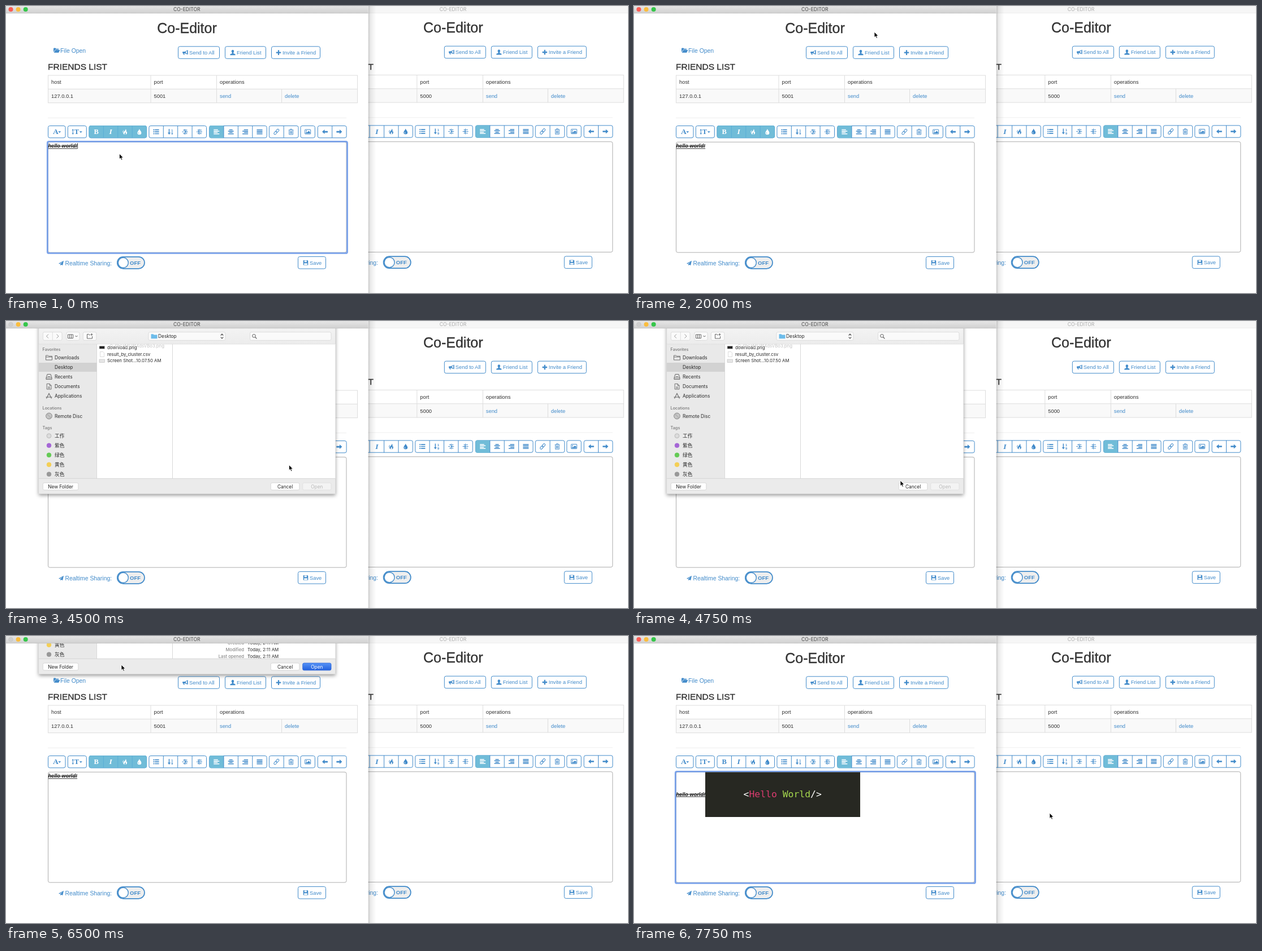
Write an HTML page that moves like this. It is 1100 px wide and 509 px high and loops after 8 s.

```html
<!DOCTYPE html>
<html lang="en">
<head>
<meta charset="utf-8">
<title>Co-Editor</title>
<style>
html, body { margin: 0; width: 100%; height: 100%; overflow: hidden; background: #fff; }
svg { display: block; width: 1100px; height: 509px; }
text { font-family: "Liberation Sans", Arial, sans-serif; white-space: pre; }
.ui { font-family: Inter, "Noto Sans CJK SC", "Noto Sans CJK", sans-serif; }
.serif { font-family: "Liberation Serif", serif; }
.mono { font-family: "DejaVu Sans Mono", monospace; }
</style>
</head>
<body>
<svg id="stage" viewBox="0 0 1100 509" xmlns="http://www.w3.org/2000/svg"></svg>
<script>
const BLUE = '#428bca', ACTIVE = '#70bcd8', DARK = '#333';
const LOOP = 8000, STEP = 250;

// Drawing helpers
const text = (x, y, s, size, fill = DARK, extra = '') =>
  `<text x="${x}" y="${y}" font-size="${size}" fill="${fill}" ${extra}>${s}</text>`;
const ui = (x, y, s, size, fill = '#2a2a2a', extra = '') =>
  text(x, y, s, size, fill, 'class="ui" ' + extra);
const rect = (x, y, w, h, fill, stroke = 'none', r = 0, extra = '') =>
  `<rect x="${x}" y="${y}" width="${w}" height="${h}" rx="${r}" fill="${fill}" stroke="${stroke}" ${extra}/>`;
const dot = (x, y, r, fill, stroke = 'none', extra = '') =>
  `<circle cx="${x}" cy="${y}" r="${r}" fill="${fill}" stroke="${stroke}" ${extra}/>`;
const line = (d, stroke = 'currentColor', w = 1) =>
  `<path d="${d}" fill="none" stroke="${stroke}" stroke-width="${w}"/>`;
const solid = (d, fill = 'currentColor') => `<path d="${d}" fill="${fill}" fill-rule="evenodd"/>`;
const layer = (id, body, extra = '') => `<g id="${id}" ${extra}>${body}</g>`;
const rows = (starts, widths) =>
  line(starts.map((x, i) => `M${x} ${i * 2.4 - 3.6}h${widths[i]}`).join(''), 'currentColor', 1.5);
const letter = (s, x, size, extra) =>
  text(x, 4.2, s, size, 'currentColor', `class="serif" text-anchor="middle" ${extra}`);
const caret = x => solid(`M${x} -.8h5l-2.5 2.8z`);
const indent = dir =>
  line('M0 -5V5M-5 0H-2', 'currentColor', 1) +
  line('M1 -3H4M1 0H5M1 3H4M-3 -3H0M-3 3H0', 'currentColor', 1.2) +
  solid(`M${-2 * dir} -2v4l${2.4 * dir} -2z`);
const arrow = d => solid(`M${-5 * d} 0L${-.5 * d} -4V-1.3H${5 * d}V1.3H${-.5 * d}V4Z`);

const icons = {
  font: letter('A', -2, 13.5, 'font-weight="bold"') + caret(2.5),
  size: line('M-7.5 -4V4', 'currentColor', 1) + solid('M-9.3 -2.5l1.8 -2.5 1.8 2.5zM-9.3 2.5l1.8 2.5 1.8 -2.5z') +
    letter('T', -1, 12.5, 'font-weight="bold"') + caret(4),
  bold: letter('B', 0, 12.5, 'font-weight="bold"'),
  italic: letter('I', 0, 13.5, 'font-style="italic" font-weight="bold"'),
  fire: solid('M1 -5C2 -2 -4 0 -3 3 -2.7 4 -1.6 5 -.5 5 -1.8 3 .5 2 .4 .5 2 2 1.6 4 .8 5 3.5 4.4 4.2 2 3 -.6L2.3 .6C2.4 -2 2.4 -3.8 1 -5ZM-2.5 -3C-3.6 -1.5 -4.8 0 -4 2 -3.7 0 -2 -1 -2.5 -3Z'),
  drop: solid('M0 -5C1 -2.2 3.5 -.5 3.5 1.8A3.5 3.3 0 0 1 -3.5 1.8C-3.5 -.5 -1 -2.2 0 -5ZM-2 1.5C-2 3 -1 3.6 0 3.8 -.8 3 -1 2.3 -1 1.2Z'),
  bullets: line('M-2.4 -3.4H5M-2.4 0H5M-2.4 3.4H5', 'currentColor', 1.7) +
    [-3.4, 0, 3.4].map(y => dot(-4.2, y, 1.1, 'currentColor')).join(''),
  order: line('M-2.5 -5V3', 'currentColor', 1.5) + solid('M-5 1.5h5l-2.5 3.6z') +
    text(1.2, -.4, '1', 5.5, 'currentColor', 'font-weight="bold"') + text(1.2, 5, '9', 5.5, 'currentColor', 'font-weight="bold"'),
  outdent: indent(-1),
  indent: indent(1),
  left: rows([-5, -5, -5, -5], [7.5, 10, 7, 10]),
  center: rows([-3, -5, -3, -5], [6, 10, 6, 10]),
  right: rows([-2.5, -5, -2, -5], [7.5, 10, 7, 10]),
  justify: rows([-5, -5, -5, -5], [10, 10, 10, 10]),
  link: `<g transform="rotate(-48)">${rect(-5.8, -1.9, 6.2, 3.8, 'none', 'currentColor', 1.9)}${rect(-.4, -1.9, 6.2, 3.8, 'none', 'currentColor', 1.9)}</g>`,
  trash: line('M-4.3 -3.2H4.3M-1.5 -3.4V-4.8H1.5V-3.4M-3.4 -3V4.8H3.4V-3M-1.4 -1.5V3.5M0 -1.5V3.5M1.4 -1.5V3.5', 'currentColor', .9),
  image: rect(-5, -4, 10, 8, 'none', 'currentColor', .6) + dot(-2.4, -1.6, 1, 'currentColor') + solid('M-4 3V1.8L-2 .2 -.8 1.2 1.7 -1.8 4 .8V3Z'),
  back: arrow(1),
  next: arrow(-1),
  horn: solid('M-5 -1.6L-1 -1.8 4 -4.5V3.5L-1 1.2 -2 1.2 -1.2 4H-3L-4 1.2H-5ZM4.4 -4.5h.8v8h-.8zM1 -2v2.7l2 1V-3z'),
  user: solid('M0 -5C3 -5 2.7 -.9 1.2 .4V1.4L4.8 3V4.8H-4.8V3L-1.2 1.4V.4C-2.7 -.9 -3 -5 0 -5Z'),
  plus: solid('M-1.2 -4.5h2.4v3.3h3.3v2.4h-3.3v3.3h-2.4v-3.3h-3.3v-2.4h3.3z'),
  folder: solid('M-5.5 3V-3.6L-4.8 -4.4H-2L-1 -3.2H3.6V-1.6H-2.6ZM-2.2 -1H6L3.6 3.8H-4.8Z'),
  disk: solid('M-4.5 -4.5H3.5L4.5 -3.5V4.5H-4.5ZM-2.5 -4V-1H2V-4ZM-3 1V4H3V1Z'),
  plane: solid('M5 -5L3 4.2 -.2 2.8 -1.7 4.8V2L3 -3 -2.8 1.5 -5 .5Z')
};
const icon = (name, x, y, color = BLUE, scale = 1) =>
  `<g transform="translate(${x} ${y}) scale(${scale})" color="${color}">${icons[name]}</g>`;

// Toolbar group; active is '', 'first' or 'all'
function group(x, names, active = '', cell = 25.4) {
  const y = 212.5, h = 21.3, w = cell * names.length, all = active === 'all';
  let s = rect(x, y, w, h, all ? ACTIVE : '#fff', all ? '#62b3d6' : BLUE, 3);
  if (active === 'first') s += solid(`M${x + cell} ${y - .5}h${3 - cell}q-3 0 -3 3v${h - 5}q0 3 3 3h${cell - 3}z`, ACTIVE);
  names.forEach((n, i) => {
    if (i) s += line(`M${x + cell * i} ${y}v${h}`, all ? '#5aaed6' : BLUE);
    s += icon(n, x + cell * (i + .5), y + 10.6, all || (active === 'first' && !i) ? '#fff' : BLUE);
  });
  return s;
}
const button = (x, y, w, name, label, tx) =>
  rect(x, y, w, 21.5, '#fff', BLUE, 3) + icon(name, tx - 7, y + 10.8, BLUE, .95) + text(tx, y + 14.3, label, 9.33, BLUE);

function page(port, marks) {
  const medium = (c, w) => `stroke="${c}" stroke-width="${w}"`;
  const format = ['bold', 'italic', 'fire', 'drop'];
  return text(320, 48, 'Co-Editor', 25, DARK, 'text-anchor="middle" ' + medium(DARK, .35)) +
    icon('folder', 89.5, 79) + text(96, 82.6, 'File Open', 10.4, BLUE) +
    button(304.5, 71.8, 73, 'horn', 'Send to All', 324) +
    button(387.5, 71.8, 72, 'user', 'Friend List', 408) +
    button(469.5, 71.8, 86, 'plus', 'Invite a Friend', 489) +
    text(74, 113.4, 'FRIENDS LIST', 15.5, DARK, medium(DARK, .35)) +
    rect(74.5, 147.5, 547, 24, '#f9f9f9') + rect(74.5, 123, 547, 48.7, 'none', '#ddd') +
    line('M74 147.3H622M256 123V171.7M372.5 123V171.7M487.5 147.3V171.7', '#ddd') +
    text(80, 138.2, 'host', 9.33) + text(261.5, 138.2, 'port', 9.33) + text(378, 138.2, 'operations', 9.33) +
    text(80, 163.2, '127.0.0.1', 9.33) + text(261.5, 163.2, port, 9.33) +
    text(378, 163.2, 'send', 9.33, BLUE) + text(493, 163.2, 'delete', 9.33, BLUE) +
    line('M74 198.5H602', '#eee') +
    group(74.5, ['font'], '', 30.5) + group(109.3, ['size'], '', 33) +
    group(147, format) + (marks ? layer('marks', group(147, format, 'all')) : '') +
    group(252.9, ['bullets', 'order', 'outdent', 'indent']) +
    group(359.6, ['left', 'center', 'right', 'justify'], 'first') +
    group(465.4, ['link', 'trash'], '', 25.8) + group(521, ['image']) + group(551.3, ['back', 'next']) +
    rect(74.5, 241.3, 527.5, 195.8, '#fff', '#adadad', 3) +
    icon('plane', 97.5, 456.2, BLUE, .9) + text(104.5, 459.8, 'Realtime Sharing:', 10.4, BLUE) +
    rect(196.8, 444.8, 48.2, 21, '#eee', BLUE, 10.5, 'stroke-width="1.7"') +
    dot(207.3, 455.3, 9, '#fff', BLUE, 'stroke-width="1.4"') +
    text(219, 458.8, 'OFF', 9.5, BLUE, 'font-weight="bold"') +
    button(516.5, 444.5, 49, 'disk', 'Save', 537);
}

const picture = `${rect(0, 0, 274, 79.5, '#272822')}<text class="mono" x="67.6" y="44.5" font-size="16.4" fill="#fff">&lt;<tspan fill="#dc3c70">Hello</tspan> <tspan fill="#a6d94e">World</tspan>/&gt;</text>`;
const place = (x, y, scale = 1) => `<g transform="translate(${x} ${y}) scale(${scale})">${picture}</g>`;

function dialog() {
  const control = (x, w) => rect(x, 19.7, w, 14.6, '#fafafa', '#d6d6d6', 2.5, 'stroke-width=".8"');
  const push = (x, w, label, fill = '#fff', color = '#222', edge = '#d0d0d0') =>
    rect(x, 287, w, 12.8, fill, edge, 2.5, 'stroke-width=".8"') + ui(x + w / 2, 296.5, label, 8.3, color, 'text-anchor="middle"');
  const head = (y, s) => ui(64.5, y, s, 7.3, '#777', 'font-weight="500"');
  const places = ['Downloads', 'Desktop', 'Recents', 'Documents', 'Applications'];
  const tags = [['工作', '#dcdcdc'], ['紫色', '#a566d6'], ['绿色', '#64cb55'], ['黄色', '#f4cf55'], ['灰色', '#989898']];
  const folder = (x, y, c) => line(`M${x} ${y + 3.8}v-8h4l1 1.3h6v6.7zM${x} ${y - 1.4}h11`, c, .9);
  const thumb = rect(165, 44.3, 9.5, 5, '#222', '#ccc', 0, 'stroke-width=".7"');
  const meta = (y, k, v, c = '#2a2a2a') => ui(421, y, k, 7.7, '#888', 'text-anchor="end" font-weight="500"') + ui(427, y, v, 7.9, c);
  const pick =
    rect(160.5, 41, 134, 11.4, '#2460dc') + thumb + ui(179, 49.8, 'download.png', 7.8, '#fff') +
    rect(381.5, 94.5, 114, 39.5, '#fff', '#ddd', 1, 'filter="url(#soft)"') + place(386.5, 99, .3814) +
    ui(438, 205.2, 'download.png', 10, '#2a2a2a', 'text-anchor="middle"') +
    ui(438, 218.2, 'PNG image - 3 KB', 7.7, '#808080', 'text-anchor="middle" font-weight="500"') +
    meta(242.6, 'Tags', 'Add Tags...', '#bbb') + meta(254.4, 'Created', 'Today, 2:11 AM') +
    meta(266.2, 'Modified', 'Today, 2:11 AM') + meta(278, 'Last opened', 'Today, 2:11 AM');

  return rect(58, 0, 524.5, 306.5, '#ececec', '#c4c4c4', 1, 'stroke-width=".6" filter="url(#drop)"') +
    rect(58, 41, 102.5, 238, '#e9e9e9') + rect(160.5, 41, 422, 238, '#fff') +
    line('M160.5 41V279M294.5 41V279', '#d9d9d9') +
    rect(58, 74, 102.5, 16, '#d2d2d2') + head(53, 'Favorites') +
    places.map((s, i) => ui(86, 68.1 + i * 17, s, 8.3)).join('') +
    folder(70.5, 65.3, '#666') +
    line('M71 101L73 94.5H79L81 101V103.5H71ZM71 101H81M73.5 98.5H78.5', '#666', 1) +
    line('M72.2 111.3H77L80 114.3V121H72.2ZM77 111.3V114.3H80M74 117H78M74 119H78', '#666', .9) +
    line('M71.5 137.5L76 128.5 80.5 137.5M70.5 135H81.5', '#666', 1.1) +
    head(156.7, 'Locations') + dot(76, 168.5, 5.3, '#c9c9c9', '#777', 'stroke-width=".9"') + dot(76, 168.5, 1.5, '#f2f2f2', '#777', 'stroke-width=".6"') +
    line('M73 165.5L75 167.5M77 169.5L79 171.5', '#777', .8) + ui(86, 171.6, 'Remote Disc', 8.3) + head(192, 'Tags') +
    tags.map(([s, c], i) => dot(76, 203.7 + i * 17, 3.9, c, i ? c : '#aaa', 'stroke-width=".7"') + ui(86, 207 + i * 17, s, 8.67)).join('') +
    thumb + ui(179, 49.8, 'download.png', 7.8) +
    layer('ghost', ui(280, 47, '0_4bcaMU8t4dsVBo3.png', 7.8, '#c4c4c4', 'text-anchor="end"')) +
    line('M166.5 54.5h5l2 2v7h-7z', '#ccc', .7) + ui(179, 61.6, 'result_by_cluster.csv', 7.8) +
    rect(165, 68, 9.5, 5.5, '#e6e6e6', '#bbb', 0, 'stroke-width=".6"') + ui(179, 73.4, 'Screen Shot...10.07.50 AM', 7.8) +
    layer('pick', pick) +
    rect(58.3, 13, 524, 28, 'url(#head)') + line('M58 41H582', '#dadada', .7) +
    control(65.4, 33.6) + line('M82.3 20V34', '#d6d6d6', .8) + line('M75 23.5L71.5 27 75 30.5M89.5 23.5L93 27 89.5 30.5', '#999') +
    control(107, 23) + line('M109.5 24h9v6.5h-9zM112.5 24v6.5M115.5 24v6.5', '#555', .9) + line('M122.5 26l2 2 2 -2', '#555') +
    control(136.3, 23.5) + line('M143.5 31V23.5h3l1 1.2h1.5M143.5 31h9V27M151.5 22v4M149.5 24h4', '#555', .9) +
    control(252, 136) + solid('M256.5 31.3v-8h4l1 1.3h6v6.7z', '#6dbcea') + ui(269, 30.2, 'Desktop', 8.4) +
    line('M379.8 25.7l2.2 -2.5 2.2 2.5M379.8 28.5l2.2 2.5 2.2 -2.5', '#333', 1.1) +
    control(431.5, 143.5) + dot(438.5, 26.4, 2.8, 'none', '#555') + line('M440.6 28.5L443.4 31.3', '#555', 1.1) +
    rect(58.3, 279, 524, 27.2, '#ebebeb') + line('M58 279.3H582.5', '#d2d2d2', .8) +
    push(65.3, 62.5, 'New Folder') + push(468.3, 50.5, 'Cancel') +
    push(524.7, 50.3, 'Open', '#f3f3f3', '#b8b8b8', '#dedede') +
    layer('ready', push(524.7, 50.3, 'Open', 'url(#go)', '#fff', '#2a66dc'));
}

const grad = (id, a, b, turn = 'x2="0" y2="1"') =>
  `<linearGradient id="${id}" ${turn}><stop stop-color="${a}"/><stop offset="1" stop-color="${b}"/></linearGradient>`;
const title = (x, fill) => ui(x, 9.2, 'CO-EDITOR', 8.5, fill, 'text-anchor="middle"');

document.getElementById('stage').innerHTML =
  `<defs>${grad('bar', '#e6e6e6', '#d0d0d0')}${grad('head', '#f3f3f3', '#ececec')}${grad('go', '#5592f6', '#2260dd')}
  <linearGradient id="edge"><stop stop-color="#000" stop-opacity=".22"/><stop offset=".3" stop-color="#000" stop-opacity=".08"/><stop offset="1" stop-color="#000" stop-opacity="0"/></linearGradient>
  <filter id="drop" x="-10%" y="-10%" width="120%" height="125%"><feDropShadow dx="0" dy="2.5" stdDeviation="3" flood-opacity=".4"/></filter>
  <filter id="soft" x="-10%" y="-20%" width="120%" height="150%"><feDropShadow dx="0" dy="1" stdDeviation="1" flood-opacity=".3"/></filter></defs>` +
  rect(0, 0, 1100, 509, '#fff') +
  `<g transform="translate(470.8 -.6)">${page('5000', false)}</g>` +
  rect(640, 0, 460, 12.3, '#f6f6f6') + line('M640 12.4H1100', '#e4e4e4', .6) + title(790.5, '#aaa') +
  rect(640.5, 0, 14, 509, 'url(#edge)') +
  rect(0, 0, 640.5, 509, '#fff') + page('5001', true) +
  layer('focus', rect(73.3, 240.4, 530.2, 198, 'none', '#7aa2ea', 2.5, 'stroke-width="2.8"')) +
  layer('hello', text(74.5, 251.4, 'hello world!', 9.2, '#222', 'font-weight="bold" font-style="italic" text-decoration="underline line-through"')) +
  layer('caret', line('M126.6 243V253', '#222', .8)) +
  layer('shot', place(126, 241.5)) +
  layer('dialog', dialog()) +
  rect(0, 0, 640.5, 13, 'url(#bar)') + line('M0 12.8H640.5', '#b9b9b9', .6) + title(319.7, '#444') +
  dot(8.5, 6, 3.8, '#cfcfcf', '#bcbcbc', 'stroke-width=".5"') + layer('close', dot(8.5, 6, 4, '#fb5c55')) +
  dot(21.6, 6, 4, '#fabd3e') + dot(34.7, 6, 4, '#36c64b') +
  layer('cursor', '<path d="M0 0V9.6L2.2 7.6 3.7 11.2 5.4 10.4 3.9 7.1 6.8 6.9Z" fill="#000" stroke="#fff" stroke-width=".8"/>');

// Keyframes: time, then values
const pointer = [
  [0, 200.5, 262], [750, 490, 193], [1250, 542, 226], [1500, 542, 226], [2000, 425, 46], [2500, 425, 46],
  [3000, 530, 227.5], [4250, 530, 227.5], [4750, 471, 283], [5500, 204, 51], [6750, 204, 51], [7250, 590, 300], [7750, 735, 314]
];
const slide = [[3500, -310], [4000, 0], [6250, 0], [6500, -239], [6750, -310]];

function at(keys, t) {
  const i = keys.findIndex(k => k[0] > t);
  if (i < 0) return keys[keys.length - 1].slice(1);
  if (!i) return keys[0].slice(1);
  const a = keys[i - 1], b = keys[i], p = (t - a[0]) / (b[0] - a[0]);
  return a.slice(1).map((v, n) => v + (b[n + 1] - v) * p);
}
const el = id => document.getElementById(id);
const show = (id, on) => el(id).setAttribute('display', on ? 'inline' : 'none');
const move = (id, x, y) => el(id).setAttribute('transform', `translate(${x} ${y})`);

function draw(now) {
  const t = Math.floor(now % LOOP / STEP) * STEP;
  const open = t > 3500 && t < 6750, inserted = t >= 7000, chosen = t >= 5500;
  move('cursor', ...at(pointer, t));
  move('dialog', 0, at(slide, t)[0]);
  move('hello', 0, inserted ? 32.2 : 0);
  show('dialog', open);
  show('close', !open);
  show('ghost', t < 5000);
  show('pick', chosen);
  show('ready', chosen);
  show('focus', t < 1000 || inserted);
  show('caret', t < 1000);
  show('marks', !inserted);
  show('shot', inserted);
}
const start = performance.now();
function tick() {
  draw(performance.now() - start);
  requestAnimationFrame(tick);
}
tick();
</script>
</body>
</html>
```
